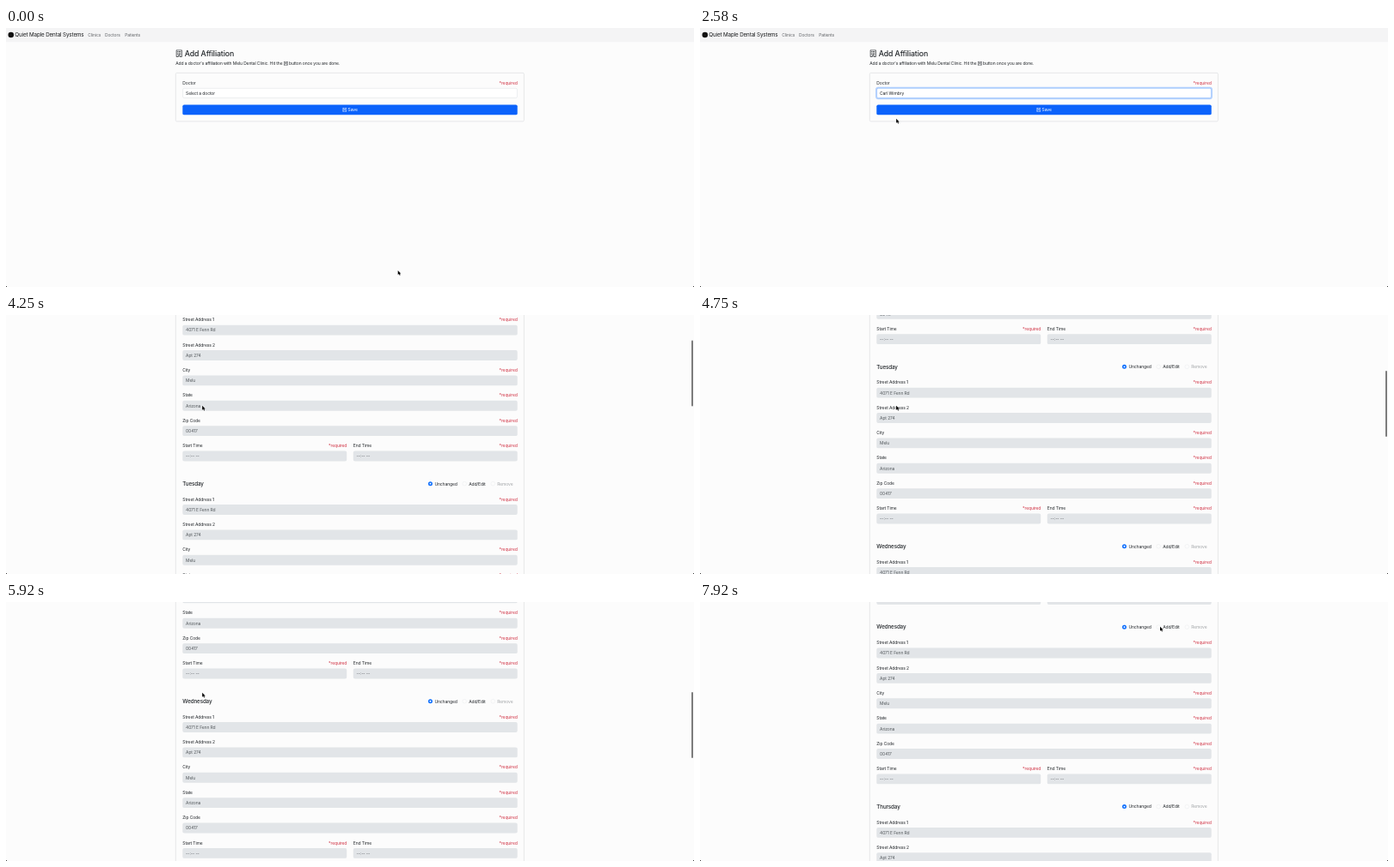
An HTML page that plays this animation: 800 by 302 pixels, repeating every 8 s.

```html
<!DOCTYPE html>
<html lang="en">
<head>
<meta charset="utf-8">
<title>Add Affiliation</title>
<style>
html, body { margin: 0; width: 100%; height: 100%; overflow: hidden; background: #fcfcfc; }
#stage { position: relative; width: 800px; height: 302px; overflow: hidden; }
#page {
  position: absolute; left: 0; top: 0; width: 2560px; height: 3720px;
  transform-origin: 0 0; color: #212529;
  font: 16px/24px Inter, sans-serif; letter-spacing: -.024em;
}
#page div { position: absolute; box-sizing: border-box; white-space: pre; }
#page svg { fill: none; stroke: currentColor; }
.nav { left: 0; top: 0; width: 2560px; height: 52px; background: #f4f4f5; }
.logo { left: 8px; top: 15px; width: 21px; height: 21px; border-radius: 50%; background: #111; }
.brand { font-size: 20px; color: #16181a; }
.link { color: #63666a; }
.title { font-size: 28px; font-weight: 500; }
.day { font-size: 20px; font-weight: 500; }
.req { color: #d02f41; }
.val { color: #53585c; }
.off { color: #a2a5a8; }
.field { height: 38px; border-radius: 6px; background: #e2e5e8; }
.badge {
  left: 732px; width: 158px; height: 26px; border-radius: 6px; background: #dc3545;
  color: #fff; font: 700 15px/26px Inter, sans-serif; text-align: center;
}
.radio { width: 16px; height: 16px; border-radius: 50%; border: 1px solid #dfe2e5; }
.radio.on { border: 5px solid #0d6efd; background: #fff; }
#card { left: 630px; top: 166px; width: 1299px; border: 3px solid #e5e6e8; border-radius: 6px; }
#select { left: 657px; top: 224px; width: 1246px; height: 38px; border: 2px solid #e2e5e8; border-radius: 6px; background: #fff; }
#select.focus { border-color: #86b7fe; box-shadow: 0 0 0 4px #b5d1fd; }
#save {
  left: 657px; width: 1246px; height: 38px; border-radius: 6px; background: #0b62fb;
  color: #fff; line-height: 38px; text-align: center;
}
#menu {
  left: 646px; top: 223px; width: 1250px; height: 93px; border-radius: 7px; overflow: hidden;
  background: linear-gradient(#5b6670, #515d6a 35%, #2f4c78 70%, #223f6e);
  border: 1px solid #36404c; box-shadow: 0 3px 10px #0006; color: #fff;
}
#hover { left: 5px; top: 35px; width: 1238px; height: 25px; border-radius: 4px; background: #3873e3; }
#bar { position: absolute; left: 797px; top: 0; width: 2.4px; height: 77px; border-radius: 2px; background: #7c7c7c; }
#cursor { position: absolute; left: 0; top: 0; width: 6px; height: 8px; overflow: visible; }
.corner { position: absolute; bottom: 0; width: 2px; height: 2px; }
</style>
</head>
<body>
<div id="stage">
  <div id="page"></div>
  <div id="bar"></div>
  <div class="corner" style="left:0;background:radial-gradient(circle at 100% 0,#0000 1.6px,#222 2.2px)"></div>
  <div class="corner" style="right:0;background:radial-gradient(circle at 0 0,#0000 1.6px,#222 2.2px)"></div>
  <svg id="cursor"><path d="M0 0V5L1.2 3.9L2 5.8L2.9 5.4L2.1 3.6H3.6Z" fill="#000" stroke="#fff" stroke-width=".5" paint-order="stroke"/></svg>
</div>
<script>
const SCALE = 0.3125, LOOP = 8000, STEP = 1000 / 12;
const LEFT = 657, RIGHT = 1903, PITCH = 670;
const DOCTORS = ['Carl Wimbry', 'Neil Vosta'];
const $ = id => document.getElementById(id);
const page = $('page');

function add(cls, parent = page, style = {}, html = '') {
  const el = document.createElement('div');
  el.className = cls;
  el.innerHTML = html;
  for (const k in style) el.style[k] = typeof style[k] === 'number' ? style[k] + 'px' : style[k];
  parent.append(el);
  return el;
}
// Text is placed by its left edge and vertical centre.
const text = (x, y, html, cls = '', parent = page) => add(cls, parent, { left: x, top: y - 12 }, html);
const required = (right, y, parent = page) =>
  add('req', parent, { right: 2560 - right, top: y - 12 }, '*required');
const named = (id, el) => { el.id = id; return el; };

const disk = `<svg width="16" height="16" viewBox="0 0 16 16" style="vertical-align:-2px">
  <path d="M1 1H15V15H1ZM4 1V6H12V1M3 15V9.5H13V15" stroke-width="1.5"/></svg>`;
const building = `<svg width="26" height="28" viewBox="0 0 26 28">
  <path d="M3 1.5H23V26.5H16V21H10V26.5H3Z" stroke-width="2.4"/>
  <path d="M7 7H19M7 12H19M7 17H19" stroke-width="3" stroke-dasharray="3 1.5"/></svg>`;

add('nav');
add('logo');
text(33, 25.6, 'Quiet Maple Dental Systems', 'brand');
text(305, 25.6, 'Clinics', 'link');
text(368, 25.6, 'Doctors', 'link');
text(442, 25.6, 'Patients', 'link');

add('', page, { left: 631, top: 81 }, building);
text(665, 95, 'Add Affiliation', 'title');
text(631, 132, `Add a doctor's affiliation with Melu Dental Clinic. Hit the ${disk} button once you are done.`);

const card = named('card', add(''));
text(LEFT, 205, 'Doctor');
required(RIGHT, 205);
const select = named('select', add(''));
const choice = text(669, 243, '');

const days = add('', page, { left: 0, top: 0, width: 2560 });
const save = named('save', add('', page, {}, disk + ' Save'));

function row(label, value, x, right, y, need = true) {
  text(x, y + 12, label, '', days);
  if (need) required(right, y + 12, days);
  add('field', days, { left: x, top: y + 32, width: right - x });
  text(x + 12, y + 51, value, 'val', days);
}

const ROWS = [
  ['Street Address 1', '4071 E Fenn Rd'], ['Street Address 2', 'Apt 274'],
  ['City', 'Melu'], ['State', 'Arizona'], ['Zip Code', '00417']
];
['Monday', 'Tuesday', 'Wednesday', 'Thursday', 'Friday'].forEach((day, i) => {
  const y = 323 + i * PITCH, top = y + 46;
  text(LEFT, y, day, 'day', days);
  if (!i) add('badge', days, { top: y - 13 }, 'Doctor Unavailable');
  [[1571, 'Unchanged', ''], [1698, 'Add/Edit', i ? '' : 'off'], [1804, 'Remove', 'off']]
    .forEach(([x, label, cls], k) => {
      add(k ? 'radio' : 'radio on', days, { left: x, top: y - 8 });
      text(x + 24, y, label, cls, days);
    });
  ROWS.forEach(([label, value], k) => row(label, value, LEFT, RIGHT, top + 94 * k, k !== 1));
  row('Start Time', '--:-- --', LEFT, 1268, top + 470);
  row('End Time', '--:-- --', 1292, RIGHT, top + 470);
});

const menu = named('menu', add(''));
const hover = named('hover', add('', menu));
const hint = text(9, 20, '✓ Select a doctor', '', menu);
hint.style.color = '#8b949c';
DOCTORS.forEach((name, i) => text(25, 46 + 26 * i, name, '', menu));

// Tables of [time, values...]
const POINTER = [
  [167, 455.7, 282.8], [917, 235, 76], [1083, 235, 76], [1417, 234.3, 82], [2000, 234.3, 82],
  [2500, 228.2, 105.8], [6833, 228.2, 105.8], [7500, 535, 28.8]
];
const SCROLL = [[3833, 0], [4750, 250], [5917, 404], [6750, 494.5], [7083, 490.5]];
const OPEN = 1080, PICK = 2000, LOAD = 2660;

const clamp = v => Math.max(0, Math.min(1, v));
const smooth = p => p * p * (3 - 2 * p);
function at(table, t, ease = p => p) {
  let i = 0;
  while (i < table.length - 2 && t >= table[i + 1][0]) i++;
  const a = table[i], b = table[i + 1], p = ease(clamp((t - a[0]) / (b[0] - a[0])));
  return a.slice(1).map((v, k) => v + (b[k + 1] - v) * p);
}
const show = (el, on) => { el.style.visibility = on ? 'visible' : 'hidden'; };

function draw(now) {
  const t = Math.floor(((now % LOOP) + 1) / STEP) * STEP;
  const [x, y] = at(POINTER, t, smooth), [scroll] = at(SCROLL, t);
  const loaded = t >= LOAD;

  page.style.transform = `translateY(${-scroll}px) scale(${SCALE})`;
  $('cursor').style.transform = `translate(${x}px, ${y}px)`;
  $('bar').style.transform = `translateY(${scroll * 0.26}px)`;
  $('bar').style.opacity = t < 3900 ? 0 : 1 - clamp((t - 7250) / 250);

  show(menu, t >= OPEN && t < PICK);
  show(hover, t >= OPEN && t < PICK && y > 80);
  show(days, loaded);
  select.className = t >= OPEN ? 'focus' : '';
  choice.textContent = t < PICK ? 'Select a doctor' : DOCTORS[0];
  card.style.height = (loaded ? 3511 : 184) + 'px';
  save.style.top = (loaded ? 3613 : 286) + 'px';
}

const start = performance.now();
function tick() {
  draw(performance.now() - start);
  requestAnimationFrame(tick);
}
tick();
</script>
</body>
</html>
```
